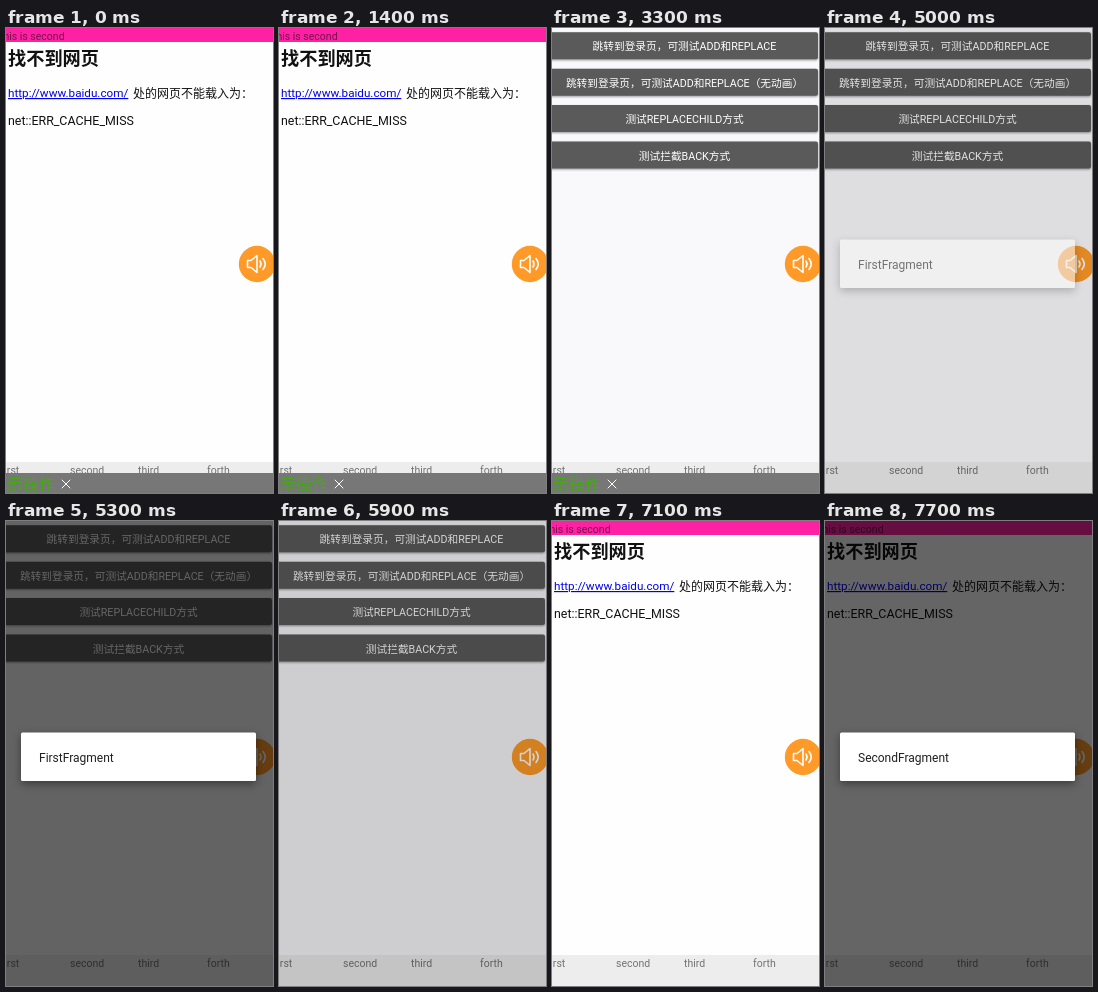
Animation of 267x465 px, one loop 8000 ms. Source, as an HTML page:

```html
<!DOCTYPE html>
<html lang="zh-CN">
<head>
<meta charset="utf-8">
<style>
html, body { margin: 0; width: 100%; height: 100%; overflow: hidden; background: #fff; }
svg { display: block; width: 267px; height: 465px; }
text { font: 12px Roboto, "Noto Sans CJK SC", "Noto Sans CJK", sans-serif; fill: #111; }
.tab text, .title { font-size: 10.5px; fill: #737373; }
text.title { fill: rgba(0, 0, 0, .54); }
text.head { font-size: 18.2px; font-weight: 700; }
text.link { font-size: 11.7px; fill: #00e; text-decoration: underline; }
text.err { font-size: 12.4px; }
#buttons rect { fill: #5a5a5a; filter: drop-shadow(0 1px 1px rgba(0, 0, 0, .4)); }
#buttons text { font-size: 10.7px; fill: #fff; text-anchor: middle; }
#bar text { font-size: 16px; font-weight: 500; fill: #3fae0a; }
.line { fill: none; stroke: #fff; stroke-linecap: round; stroke-linejoin: round; }
#dialog rect { fill: #fff; filter: drop-shadow(0 3px 4px rgba(0, 0, 0, .4)); }
#dialog text { fill: #212121; }
</style>
</head>
<body>
<svg viewBox="0 0 267 465">
  <g id="first">
    <rect width="267" height="465" fill="#f9f9fc"/>
    <g id="buttons"></g>
  </g>
  <g id="second">
    <rect width="267" height="465" fill="#fefefe"/>
    <rect width="267" height="14" fill="#ff21a3"/>
    <text class="title" x="-6" y="11.5">this is second</text>
    <text class="head" x="2" y="36.5">找不到网页</text>
    <text class="link" x="2" y="69">http://www.baidu.com/</text>
    <text x="127" y="69.5">处的网页不能载入为：</text>
    <text class="err" x="2" y="97">net::ERR_CACHE_MISS</text>
  </g>
  <g class="tab">
    <rect y="434" width="267" height="31" fill="#ededed"/>
    <text x="-5" y="446">first</text>
    <text x="64" y="446">second</text>
    <text x="132" y="446">third</text>
    <text x="201" y="446">forth</text>
  </g>
  <g id="bar">
    <rect y="445" width="267" height="20" fill="#777"/>
    <text x="-15" y="461.5">显示操作</text>
    <path class="line" d="M56 452l8 8m0-8l-8 8"/>
  </g>
  <circle cx="251" cy="236" r="18.2" fill="#ff9a28"/>
  <path class="line" stroke-width="1.6" d="M241.5 232.5h3.5l6-5v17l-6-5h-3.5zM254 233q2 3 0 6M257 230.500q4.500 5.500 0 11"/>
  <rect id="dim" width="267" height="465"/>
  <g id="dialog">
    <rect x="15" y="211.500" width="235" height="48.500" rx="1.500"/>
    <text x="33" y="241"></text>
  </g>
</svg>
<script>
const $ = id => document.getElementById(id);
const labels = [
  '跳转到登录页，可测试ADD和REPLACE',
  '跳转到登录页，可测试ADD和REPLACE（无动画）',
  '测试REPLACECHILD方式',
  '测试拦截BACK方式'
];
$('buttons').innerHTML = labels.map((label, i) => {
  const y = 4.3 + i * 36.4;
  return `<rect x="-4" y="${y}" width="270" height="27" rx="2"/>
    <text x="132.500" y="${y + 18}">${label}</text>`;
}).join('');

const ramp = (t, start, length) => Math.min(1, Math.max(0, (t - start) / length));
const show = (id, on) => $(id).style.display = on ? '' : 'none';

function draw(now) {
  const t = Math.floor(now % 8000 / 100) * 100;
  const onFirst = t >= 2100 && t < 6800;
  show('first', onFirst);
  show('second', !onFirst);
  show('bar', t < 3900);

  const opened = onFirst ? 4950 : 7150;
  const closed = onFirst ? 5650 : 8000;
  const level = (fadeIn, fadeOut) => ramp(t, opened, fadeIn) - ramp(t, closed, fadeOut);
  $('dim').style.opacity = 0.6 * level(270, 350);
  $('dialog').style.opacity = level(90, 150);
  $('dialog').lastElementChild.textContent = onFirst ? 'FirstFragment' : 'SecondFragment';
}

const begin = performance.now();
function tick() {
  draw(performance.now() - begin);
  requestAnimationFrame(tick);
}
tick();
</script>
</body>
</html>
```
